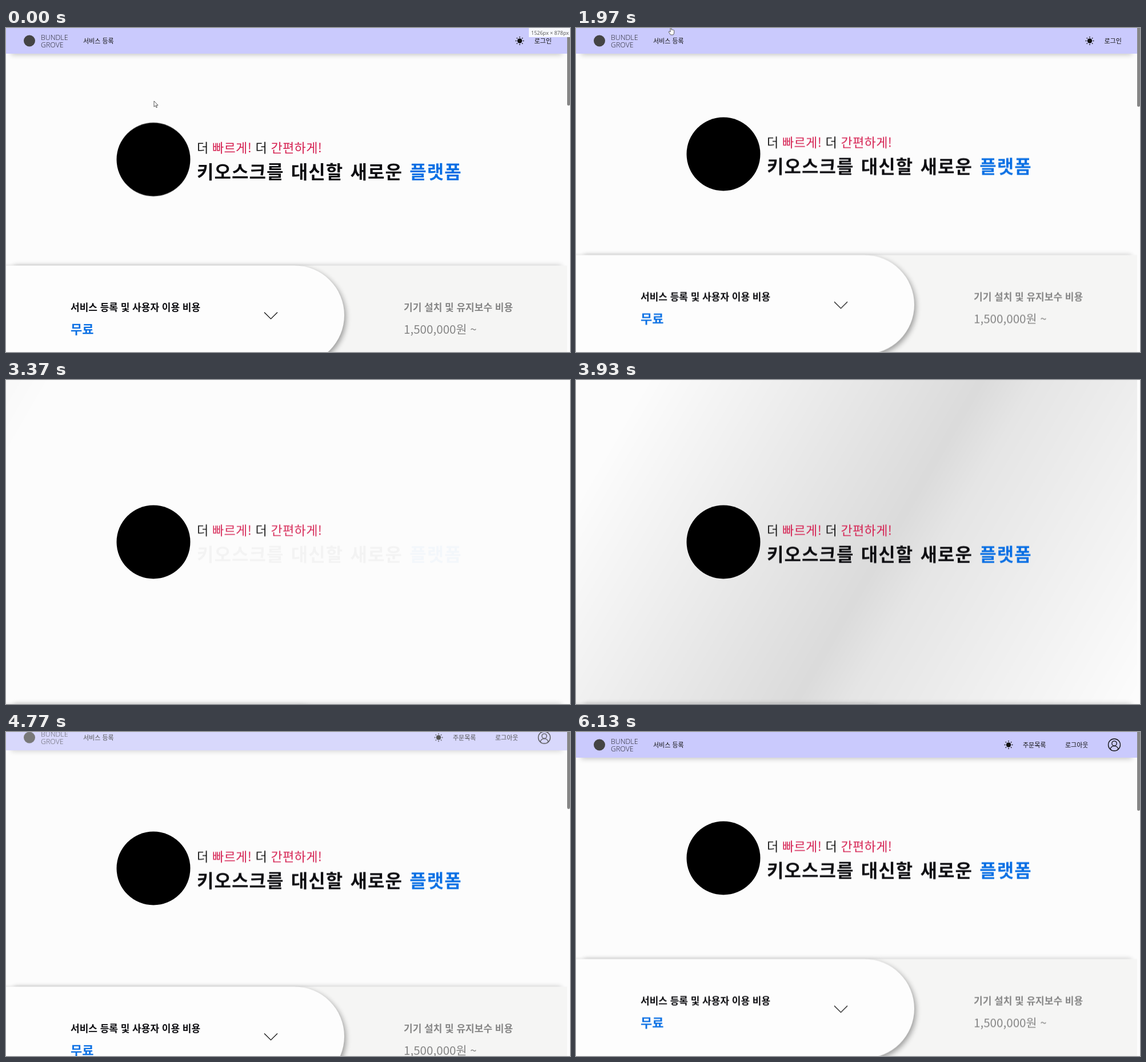
Write an HTML page that moves like this. It is 987 px wide and 568 px high and loops after 7.16 s.

```html
<!DOCTYPE html>
<html lang="ko">
<head>
<meta charset="utf-8">
<title>Landing page intro</title>
<style>
  html, body { margin: 0; width: 100%; height: 100%; overflow: hidden; background: #fcfcfc; }
  svg { display: block; }
  text { font-family: "Noto Sans CJK KR", "Noto Sans CJK", "Noto Sans", sans-serif; white-space: pre; }

  /* Times on the 7160 ms loop: 970 = 13.547%, 2070 = 28.911%, 2330 = 32.542%,
     3330 = 46.508%, 4070 = 56.844%, 4330 = 60.475%, 5030 = 70.251% */
  .anim { animation: 7160ms linear infinite; }
  #header { animation-name: header; }
  #hero { animation-name: hero; }
  #costs { animation-name: costs; }
  #thumb { animation-name: thumb; }
  #mark { animation-name: mark; }
  #lead { animation-name: lead; }
  #headline { animation-name: headline; }
  #sheen { animation-name: sheen; }
  #guest { animation-name: guest; }
  #member { animation-name: member; }
  #size { animation-name: size; }
  #cursor { animation-name: cursor; }
  #arrow { animation-name: arrow; }
  #hand { animation-name: hand; }

  @keyframes header {
    0% { transform: none; opacity: 1; animation-timing-function: step-end; }
    32.542% { transform: translateY(-45px); opacity: 0; animation-timing-function: step-end; }
    60.475% { transform: translateY(-45px); opacity: 0; animation-timing-function: ease-in-out; }
    70.251%, 100% { transform: none; opacity: 1; }
  }
  @keyframes hero {
    0% { transform: translateY(9.5px); animation-timing-function: cubic-bezier(.33, 1, .68, 1); }
    13.547% { transform: translateY(0); animation-timing-function: step-end; }
    32.542% { transform: translateY(63px); animation-timing-function: step-end; }
    60.475% { transform: translateY(63px); animation-timing-function: ease-in-out; }
    70.251%, 100% { transform: translateY(0); }
  }
  @keyframes costs {
    0% { transform: translateY(18.5px); animation-timing-function: cubic-bezier(.33, 1, .68, 1); }
    13.547% { transform: translateY(0); animation-timing-function: step-end; }
    32.542% { transform: translateY(170px); animation-timing-function: step-end; }
    60.475% { transform: translateY(170px); animation-timing-function: ease-in-out; }
    70.251%, 100% { transform: translateY(0); }
  }
  @keyframes thumb {
    0% { transform: translateY(-2px); opacity: 1; animation-timing-function: ease-out; }
    13.547% { transform: translateY(0); opacity: 1; animation-timing-function: step-end; }
    32.542% { transform: translateY(-12px); opacity: 0; animation-timing-function: step-end; }
    60.475% { transform: translateY(-12px); opacity: 1; animation-timing-function: ease-in-out; }
    70.251%, 100% { transform: translateY(0); opacity: 1; }
  }
  @keyframes mark {
    0% { opacity: 1; animation-timing-function: step-end; }
    32.542% { opacity: 0; }
    39.525%, 100% { opacity: 1; }
  }
  @keyframes lead {
    0% { opacity: 1; animation-timing-function: step-end; }
    32.542% { opacity: 0; }
    39.525% { opacity: 0; }
    47.486%, 100% { opacity: 1; }
  }
  @keyframes headline {
    0% { opacity: 1; animation-timing-function: step-end; }
    32.542% { opacity: 0; }
    46.788% { opacity: 0; }
    54.469%, 100% { opacity: 1; }
  }
  @keyframes sheen {
    0% { transform: translateX(-1200px); animation-timing-function: step-end; }
    46.508% { transform: translateX(-440px); animation-timing-function: cubic-bezier(.32, 0, .67, 0); }
    56.844% { transform: translateX(1533px); animation-timing-function: step-end; }
    56.9%, 100% { transform: translateX(1800px); }
  }
  @keyframes guest {
    0% { opacity: 1; animation-timing-function: step-end; }
    32.542%, 100% { opacity: 0; }
  }
  @keyframes member {
    0% { opacity: 0; animation-timing-function: step-end; }
    32.542%, 100% { opacity: 1; }
  }
  @keyframes size {
    0% { opacity: 1; animation-timing-function: step-end; }
    13.5%, 100% { opacity: 0; }
  }
  @keyframes cursor {
    0% { transform: translate(259px, 128px); opacity: 1; animation-timing-function: ease-in-out; }
    5.6% { transform: translate(166px, -1px); opacity: 1; animation-timing-function: step-end; }
    28.911%, 100% { transform: translate(166px, -1px); opacity: 0; }
  }
  @keyframes arrow {
    0% { opacity: 1; animation-timing-function: step-end; }
    3.35%, 100% { opacity: 0; }
  }
  @keyframes hand {
    0% { opacity: 0; animation-timing-function: step-end; }
    3.35%, 100% { opacity: 1; }
  }

  .nav { font-size: 11px; font-weight: 500; fill: #111; }
  .brand { font: 300 12.4px "Open Sans", "Noto Sans", sans-serif; fill: #26262e; }
  .lead { font-size: 22px; font-weight: 300; letter-spacing: .3px; fill: #151515; }
  .big { font-size: 32px; font-weight: 700; letter-spacing: 1.06px; word-spacing: 2.2px; fill: #0c0c10; }
  .label { font-size: 17px; font-weight: 600; }
  .price { font-size: 20.6px; font-weight: 300; fill: #858585; }
  .red { fill: #d51f50; }
  .blue { fill: #0b70e4; }
  .line { fill: none; stroke: #111; stroke-width: 1.3; }
</style>
</head>
<body>
<svg width="987" height="568" viewBox="0 0 987 568">
  <defs>
    <linearGradient id="band">
      <stop offset="0" stop-opacity="0"/>
      <stop offset=".5" stop-opacity=".13"/>
      <stop offset=".58" stop-opacity=".09"/>
      <stop offset="1" stop-opacity="0"/>
    </linearGradient>
    <filter id="soft" x="-20%" y="-30%" width="140%" height="160%">
      <feGaussianBlur stdDeviation="5"/>
    </filter>
    <path id="card" d="M-30 398H505a87 87 0 0 1 0 174H-30z"/>
    <g id="sun">
      <circle r="4.2" fill="#111"/>
      <path class="line" d="M0-5.6V-7.4M0 5.6V7.4M-5.6 0H-7.4M5.6 0H7.4M-4-4-5.3-5.3M4-4 5.3-5.3M-4 4-5.3 5.3M4 4 5.3 5.3"/>
    </g>
  </defs>

  <rect width="987" height="568" fill="#fcfcfc"/>
  <g transform="rotate(30)">
    <rect id="sheen" class="anim" x="-510" y="-600" width="1020" height="1200" fill="url(#band)"/>
  </g>

  <g id="hero" class="anim">
    <circle id="mark" class="anim" cx="258" cy="221" r="64.5" fill="#000"/>
    <text id="lead" class="anim lead" x="334" y="209">더 <tspan class="red">빠르게!</tspan> 더 <tspan class="red">간편하게!</tspan></text>
    <text id="headline" class="anim big" x="334" y="255">키오스크를 대신할 새로운 <tspan class="blue">플랫폼</tspan></text>
  </g>

  <g id="costs" class="anim">
    <rect x="14" y="398" width="958" height="180" opacity=".24" filter="url(#soft)"/>
    <rect y="398" width="987" height="180" fill="#f5f5f4"/>
    <use href="#card" x="3" y="4" opacity=".36" filter="url(#soft)"/>
    <use href="#card" fill="#fdfdfd"/>
    <text class="label" x="113" y="478" fill="#0c0c10">서비스 등록 및 사용자 이용 비용</text>
    <text class="blue" x="113" y="517.5" font-size="22" font-weight="700">무료</text>
    <path class="line" d="M452 480 463.5 491.5 475 480"/>
    <text class="label" x="696" y="478" fill="#858585">기기 설치 및 유지보수 비용</text>
    <text class="price" x="696" y="517.5">1,500,000원 ~</text>
  </g>

  <g id="header" class="anim">
    <rect x="9" y="10" width="964" height="37" opacity=".22" filter="url(#soft)"/>
    <rect width="982" height="45" fill="#cacafd"/>
    <circle cx="41" cy="22.5" r="10" fill="#444"/>
    <text class="brand" x="61" y="21.3">BUNDLE</text>
    <text class="brand" x="61" y="33.8">GROVE</text>
    <text class="nav" x="135" y="27">서비스 등록</text>
    <g id="guest" class="anim">
      <use href="#sun" x="899" y="22.5"/>
      <text class="nav" x="924.5" y="27">로그인</text>
    </g>
    <g id="member" class="anim">
      <use href="#sun" x="757" y="22.5"/>
      <text class="nav" x="782" y="27">주문목록</text>
      <text class="nav" x="856" y="27">로그아웃</text>
      <g class="line">
        <circle cx="942" cy="22.5" r="10.5"/>
        <circle cx="942" cy="20" r="4.2"/>
        <path d="M935 30.2a7.2 7.2 0 0 1 14 0"/>
      </g>
    </g>
  </g>

  <rect x="982" width="5" height="568" fill="#fcfcfc"/>
  <rect id="thumb" class="anim" x="982" y="-20" width="5" height="158" rx="2.5" fill="#858585"/>

  <g id="size" class="anim">
    <rect x="915" width="72" height="16" fill="#f7f8fc"/>
    <text x="919" y="12" font-size="9" fill="#555" style="font-family: 'Open Sans', sans-serif">1526px × 878px</text>
  </g>

  <g id="cursor" class="anim" fill="#fff" stroke="#333" stroke-width=".8" stroke-linejoin="round">
    <path id="arrow" class="anim" d="M0 0V10.2L2.4 8 4 11.6 5.5 10.9 4 7.4H7z"/>
    <path id="hand" class="anim" d="M-.9 8V.8a1 1 0 0 1 1.9 0V4.2q1-.7 1.7.2 1-.6 1.6.3 1.3-.5 1.4.8V9Q5.6 11.6 4.2 13H-.6Q-1.6 11-3.6 8.4-3.9 6.6-2.3 7z"/>
  </g>
</svg>
</body>
</html>
```
